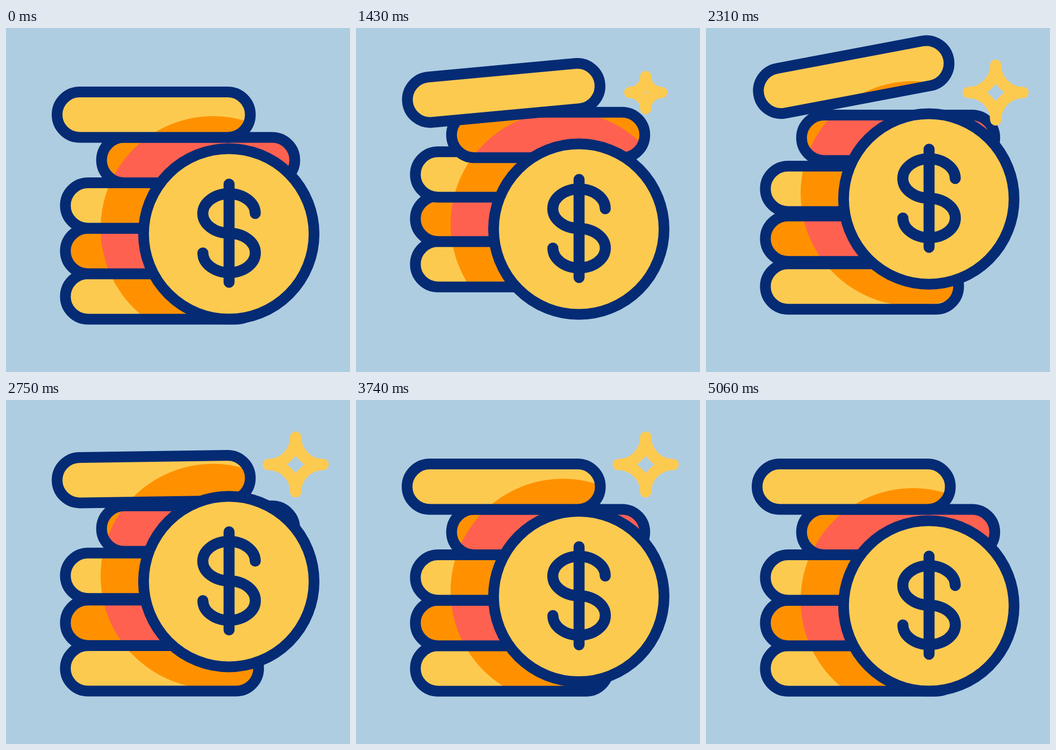
Animation of 640x640 px, one loop 5170 ms. Source, as an HTML page with a canvas:

```html
<!DOCTYPE html>
<html lang="en">
<head>
<meta charset="utf-8">
<title>Coin stack</title>
<style>
  html, body { margin: 0; width: 100%; height: 100%; overflow: hidden; background: #afcde1; }
  canvas { display: block; width: 640px; height: 640px; }
</style>
</head>
<body>
<canvas id="stage"></canvas>
<script>
const LOOP = 5170, STEP = 110, SIZE = 640;
const NAVY = '#042b74', YELLOW = '#fdca50', ORANGE = '#ff9100', RED = '#ff6150', SKY = '#afcde1';
const BAR_W = 359.5, BAR_H = 84.5, LINE = 20;

// Tracks are lists of [time, value], eased between neighbours.
const rise = (height, upStart, upEnd, downStart, downEnd) =>
  [[upStart, 0], [upEnd, -height], [downStart, -height], [downEnd, 0]];

// Listed from the bottom of the stack to the top.
const bars = [
  { x: 290.2, y: 499.5, fill: YELLOW, shade: ORANGE, lift: rise(60, 90, 1090, 1490, 2790) },
  { x: 290.2, y: 415, fill: ORANGE, shade: RED, lift: rise(60, 293, 1293, 1619, 2815) },
  { x: 290.2, y: 330.3, fill: YELLOW, shade: ORANGE, lift: rise(60, 545, 1545, 1727, 2919) },
  { x: 357.5, y: 245.8, fill: ORANGE, shade: RED, lift: rise(60, 733, 1733, 1930, 2960) },
  { x: 274.8, y: 161.3, fill: YELLOW, shade: ORANGE, lift: rise(80, 900, 1950, 2120, 2980),
    tilt: rise(11, 700, 2200, 2250, 2850) }
];
const coinLift = [[1160, 0], [2330, -65], [2350, -65], [3250, -17.5], [3850, -17.5], [4150, 0]];
const sparkReach = [[1200, 0], [1700, 67.5], [1720, 67.5], [2280, 51], [3850, 51],
  [4150, 67.5], [4250, 67.5], [4870, 0]];

const canvas = document.getElementById('stage');
const ctx = canvas.getContext('2d');
const ratio = window.devicePixelRatio || 1;
canvas.width = canvas.height = SIZE * ratio;

function valueAt(track, t) {
  if (t <= track[0][0]) return track[0][1];
  for (let i = 1; i < track.length; i++) {
    const [t0, v0] = track[i - 1], [t1, v1] = track[i];
    if (t < t1) {
      const u = (t - t0) / (t1 - t0);
      return v0 + (v1 - v0) * u * u * (3 - 2 * u);
    }
  }
  return track[track.length - 1][1];
}

function disc(x, y, r) {
  const path = new Path2D();
  path.arc(x, y, r, 0, Math.PI * 2);
  return path;
}

function outline(path, color = NAVY, width = LINE) {
  ctx.strokeStyle = color;
  ctx.lineWidth = width;
  ctx.stroke(path);
}

function paint(path, color) {
  ctx.fillStyle = color;
  ctx.fill(path);
}

function drawBar(bar, t, shadow) {
  const pill = new Path2D();
  pill.roundRect(-BAR_W / 2, -BAR_H / 2, BAR_W, BAR_H, BAR_H / 2);
  const matrix = new DOMMatrix()
    .translate(bar.x, bar.y + valueAt(bar.lift, t))
    .rotate(bar.tilt ? valueAt(bar.tilt, t) : 0);
  const path = new Path2D();
  path.addPath(pill, matrix);

  paint(path, bar.fill);
  ctx.save();
  ctx.clip(path);
  paint(shadow, bar.shade);
  ctx.restore();
  outline(path);
}

const dollar = new Path2D(
  'M463.7 345A48.8 36.7 0 1 0 415 381.7A48.8 36.7 0 1 1 366.3 418.4M415 290.5V473');

function drawCoin(lift) {
  ctx.save();
  ctx.translate(0, lift);
  const face = disc(414.5, 383, 158.6);
  paint(face, YELLOW);
  outline(face);
  outline(dollar, NAVY, 20.5);
  ctx.restore();
}

function drawSparkle(r) {
  if (r < 0.5) return;
  // Four quarter circles curving inward between the tips.
  const star = new Path2D(`M0 ${-r}A${r} ${r} 0 0 0 ${r} 0A${r} ${r} 0 0 0 0 ${r}` +
    `A${r} ${r} 0 0 0 ${-r} 0A${r} ${r} 0 0 0 0 ${-r}Z`);
  ctx.save();
  ctx.translate(539, 120);
  outline(star, YELLOW, Math.min(21, r * 1.2));
  ctx.restore();
}

function draw(t) {
  ctx.setTransform(ratio, 0, 0, ratio, 0, 0);
  ctx.lineCap = ctx.lineJoin = 'round';
  ctx.fillStyle = SKY;
  ctx.fillRect(0, 0, SIZE, SIZE);
  const lift = valueAt(coinLift, t);
  const shadow = disc(385, 373 + lift, 209);
  for (const bar of bars) drawBar(bar, t, shadow);
  drawCoin(lift);
  drawSparkle(valueAt(sparkReach, t));
}

const start = performance.now();
function tick() {
  const t = (performance.now() - start) % LOOP;
  draw(Math.floor(t / STEP) * STEP);
  requestAnimationFrame(tick);
}
tick();
</script>
</body>
</html>
```
